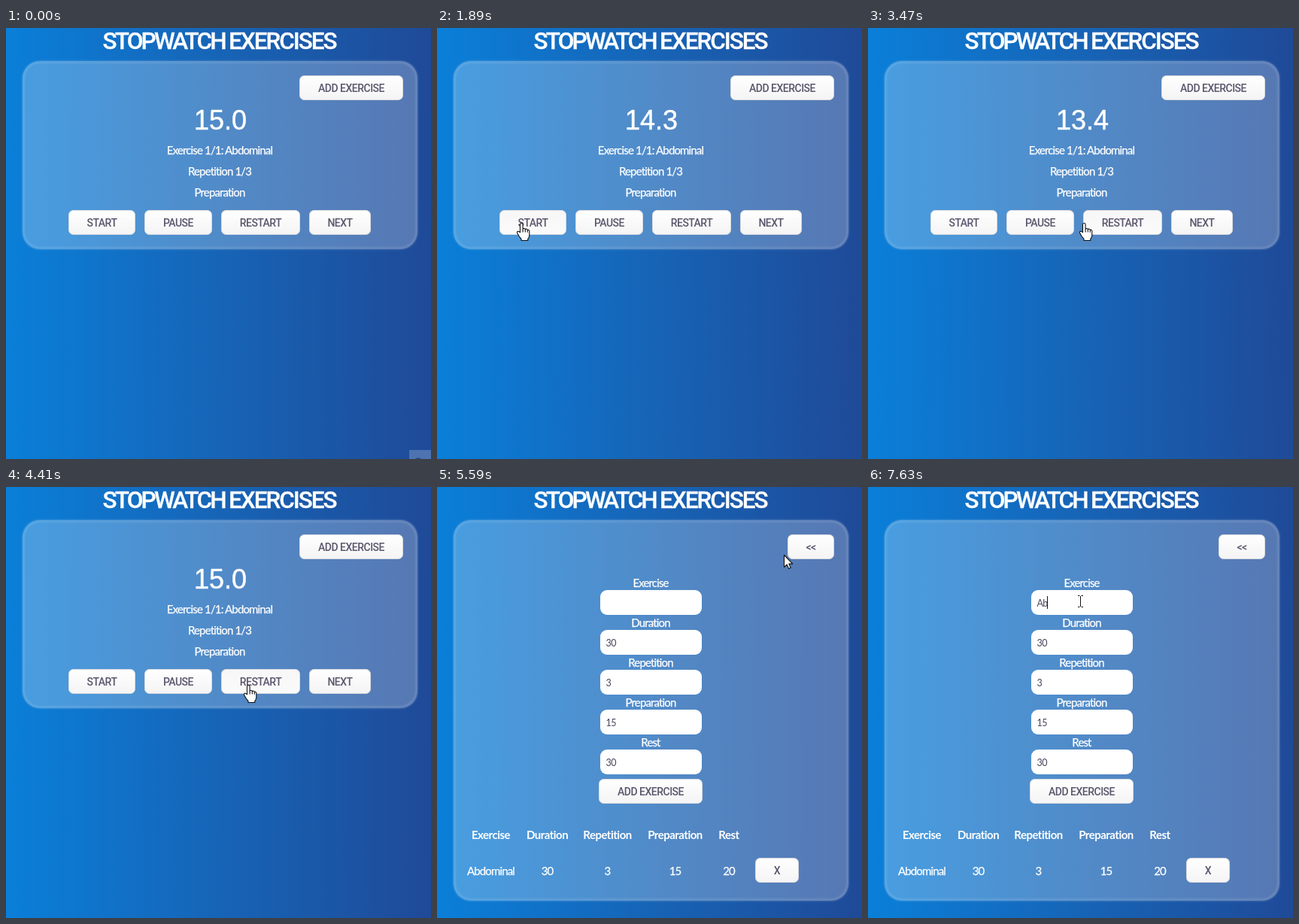
Write an HTML page that moves like this. It is 565 by 573 pixels and loops after 8000 ms.

```html
<!DOCTYPE html>
<html lang="en">
<head>
<meta charset="utf-8">
<title>Stopwatch exercises</title>
<style>
  html, body { margin: 0; width: 100%; height: 100%; overflow: hidden; }
  #stage {
    position: relative; width: 565px; height: 573px; overflow: hidden;
    background: linear-gradient(90deg, #0a7fd9, #1763b5 52%, #1f4a98);
  }
  #card {
    position: absolute; left: 22px; top: 44px; width: 525px; height: 250px;
    box-sizing: border-box; border: 2px solid rgba(255,255,255,.08); border-radius: 23px;
    background: rgba(255,255,255,.25);
    box-shadow: 0 0 3px rgba(255,255,255,.3), inset 0 0 3px rgba(255,255,255,.25);
  }
  svg { position: absolute; left: 0; top: 0; }
  text { fill: #fff; font: 15px Lato, sans-serif; letter-spacing: -.85px; text-anchor: middle; white-space: pre; }
  .line { stroke: #fff; stroke-width: .25; }
  .title { font: 500 31.5px Roboto, sans-serif; text-anchor: start; stroke: #fff; stroke-width: .3; }
  .clock { font: 36px "Liberation Sans", Arial, sans-serif; letter-spacing: 0; stroke: #fff; stroke-width: .5; }
  .head { font-weight: 700; letter-spacing: -.5px; }
  .value { font-size: 12.5px; letter-spacing: -.6px; text-anchor: start; fill: #48445c; }
  .button text { font: 500 14px Roboto, sans-serif; letter-spacing: -.5px; fill: #5b566c; }
  .button rect { fill: url(#face); stroke: #d9dade; }
  .button.hover rect { fill: url(#faceHover); }
  .pointer { fill: #fff; stroke: #111; stroke-width: 1.1; stroke-linejoin: round; }
</style>
</head>
<body>
<div id="stage">
  <div id="card"></div>
  <svg width="565" height="573" viewBox="0 0 565 573">
    <defs>
      <linearGradient id="face" x2="0" y2="1">
        <stop stop-color="#fff"/><stop offset="1" stop-color="#f4f4f5"/>
      </linearGradient>
      <linearGradient id="faceHover" x2="0" y2="1">
        <stop stop-color="#f8f7f8"/><stop offset="1" stop-color="#fbfafb"/>
      </linearGradient>
    </defs>
    <text class="title" x="128.5" y="27.5" style="letter-spacing:-2.8px">STOPWATCH</text>
    <text class="title" x="296" y="27.5" style="letter-spacing:-2px">EXERCISES</text>
    <g id="timerPage"></g>
    <g id="formPage"></g>
    <g id="corner">
      <rect x="536" y="561" width="29" height="12" fill="#4d73b1"/>
      <circle cx="548" cy="577" r="5" fill="none" stroke="#2b4585" stroke-width="1.5"/>
    </g>
    <g id="cursor">
      <circle id="flash" r="12" fill="#ffff28" opacity=".68"/>
      <path id="arrow" class="pointer" d="M.5.5V16.5l3.7-3.4 2.4 5.5 2.6-1.1-2.4-5.4h5z"/>
      <path id="hand" class="pointer" d="M-1.5 12.5V2.3a1.8 1.8 0 0 1 3.6 0V8.5a1.7 1.7 0 0 1 3.2.5a1.6 1.6 0 0 1 3 .8a1.5 1.5 0 0 1 2.5 1V16.5q0 3-2 5v2H0V21.5q-3-3-5.4-8q-.5-2 1.2-2.2q1.5 0 2.7 1.6zM2.1 8.5v4M5.3 9v3.5M8.3 9.8v3"/>
      <path id="beam" fill="none" stroke="#111" d="M-3-7.5h2.5M1.5-7.5H4M.5-7V7M-3 7.5h2.5M1.5 7.5H4"/>
    </g>
  </svg>
</div>
<script>
const LOOP = 8000, FORM_AT = 5590;
const $ = id => document.getElementById(id);

const text = (label, x, y, cls = '', id = '') =>
  `<text x="${x}" y="${y}" class="${cls}" id="${id}">${label}</text>`;
const inside = (b, [x, y]) => x >= b.x && x <= b.x + b.w && y >= b.y && y <= b.y + 33;
const button = (label, x, y, w) => ({ label, x, y, w });
const drawButton = b => `<g class="button">
  <rect x="${b.x + .5}" y="${b.y + .5}" width="${b.w - 1}" height="32" rx="6"/>
  ${text(b.label, b.x + b.w / 2, b.y + 21.5)}</g>`;

const timerButtons = [
  button('ADD EXERCISE', 390, 63, 138),
  button('START', 83, 242, 89),
  button('PAUSE', 184, 242, 90),
  button('RESTART', 286, 242, 105),
  button('NEXT', 403, 242, 82)
];
const formButtons = [
  button('&lt;&lt;', 466, 63, 62),
  button('ADD EXERCISE', 215, 388, 138),
  button('X', 423, 493, 58)
];
const fields = [['Exercise', ''], ['Duration', 30], ['Repetition', 3], ['Preparation', 15], ['Rest', 30]]
  .map(([label, value], i) => ({ label, value, x: 217, y: 137 + i * 53, w: 135 }));
const columns = [71.5, 146.5, 226.5, 316.5, 388];
const row = ['Abdominal', 30, 3, 15, 20];

$('timerPage').innerHTML =
  text('15.0', 285, 135, 'clock', 'clock') +
  text('Exercise 1/1: Abdominal', 284, 168, 'line') +
  text('Repetition 1/3', 284, 196, 'line') +
  text('Preparation', 284, 224, 'line') +
  timerButtons.map(drawButton).join('');

$('formPage').innerHTML =
  fields.map((f, i) =>
    text(f.label, 284, f.y - 4, 'line') +
    `<rect x="${f.x}" y="${f.y}" width="${f.w}" height="33" rx="9" fill="#fff"/>` +
    text(f.value, 224.5, f.y + 21.5, 'value', i ? '' : 'typed')).join('') +
  '<rect id="caret" y="145" width="1" height="17" fill="#111"/>' +
  columns.map((x, i) => text(fields[i].label, x, 468, 'head') + text(row[i], x, 516, 'line')).join('') +
  formButtons.map(drawButton).join('');

const buttons = [...timerButtons, ...formButtons];
document.querySelectorAll('.button').forEach((el, i) => buttons[i].el = el);

// Pointer hotspot: time, x, y
const path = [
  [380, 463, 464], [600, 390, 400], [800, 270, 310], [950, 150, 250], [1040, 103, 236],
  [1130, 97, 247], [1300, 97, 247], [1960, 114, 260], [2310, 114, 260], [2660, 247, 258],
  [3260, 247, 258], [3610, 313, 260], [4340, 313, 260], [4410, 322, 263], [4560, 350, 271],
  [4800, 436, 258], [5000, 468, 200], [5180, 463, 127], [5390, 462, 88], [5480, 462, 88],
  [5590, 461, 90], [5660, 461, 90], [5880, 378, 148], [6020, 312, 173], [6150, 282, 152]
];
const presses = [[1200, 1270], [2790, 2860], [3810, 3880], [5460, 5590], [6350, 6490]];

function pointerAt(t) {
  const i = path.findIndex(p => p[0] > t);
  if (i < 0) return path[path.length - 1].slice(1);
  if (!i) return path[0].slice(1);
  const [a, b] = [path[i - 1], path[i]];
  const k = (t - a[0]) / (b[0] - a[0]);
  return [a[1] + (b[1] - a[1]) * k, a[2] + (b[2] - a[2]) * k];
}

function clockAt(t) {
  if (t < 1200 || t >= 3810) return '15.0';
  return (15 - (Math.min(t, 2790) - 1165) / 1000).toFixed(1);
}

const show = (id, on) => $(id).style.display = on ? '' : 'none';

function render(t) {
  const form = t >= FORM_AT;
  const pos = pointerAt(t);
  const pressed = presses.some(([from, to]) => t >= from && t < to);
  const active = form ? formButtons : timerButtons;
  const hovered = t >= 380 && active.find(b => inside(b, pos));
  const editing = form && fields.some(f => inside(f, pos));

  show('timerPage', !form);
  show('formPage', form);
  $('card').style.height = form ? '506px' : '250px';
  show('corner', t < 70);
  $('clock').textContent = clockAt(t);

  for (const b of active) {
    b.el.classList.toggle('hover', b === hovered);
    b.el.setAttribute('transform', `translate(0 ${b === hovered && pressed ? 1 : 0})`);
  }

  const typed = t >= 7630 ? 'Ab' : t >= 7360 ? 'A' : '';
  $('typed').textContent = typed;
  $('caret').setAttribute('x', [225, 232, 238][typed.length]);
  show('caret', t >= 6390 && t < 6890 || t >= 7360);

  show('cursor', t >= 380);
  $('cursor').setAttribute('transform', `translate(${pos.map(Math.round)})`);
  show('flash', pressed);
  show('hand', hovered);
  show('beam', editing);
  show('arrow', !hovered && !editing);
}

const start = performance.now();
function tick() {
  render((performance.now() - start) % LOOP);
  requestAnimationFrame(tick);
}
tick();
</script>
</body>
</html>
```
